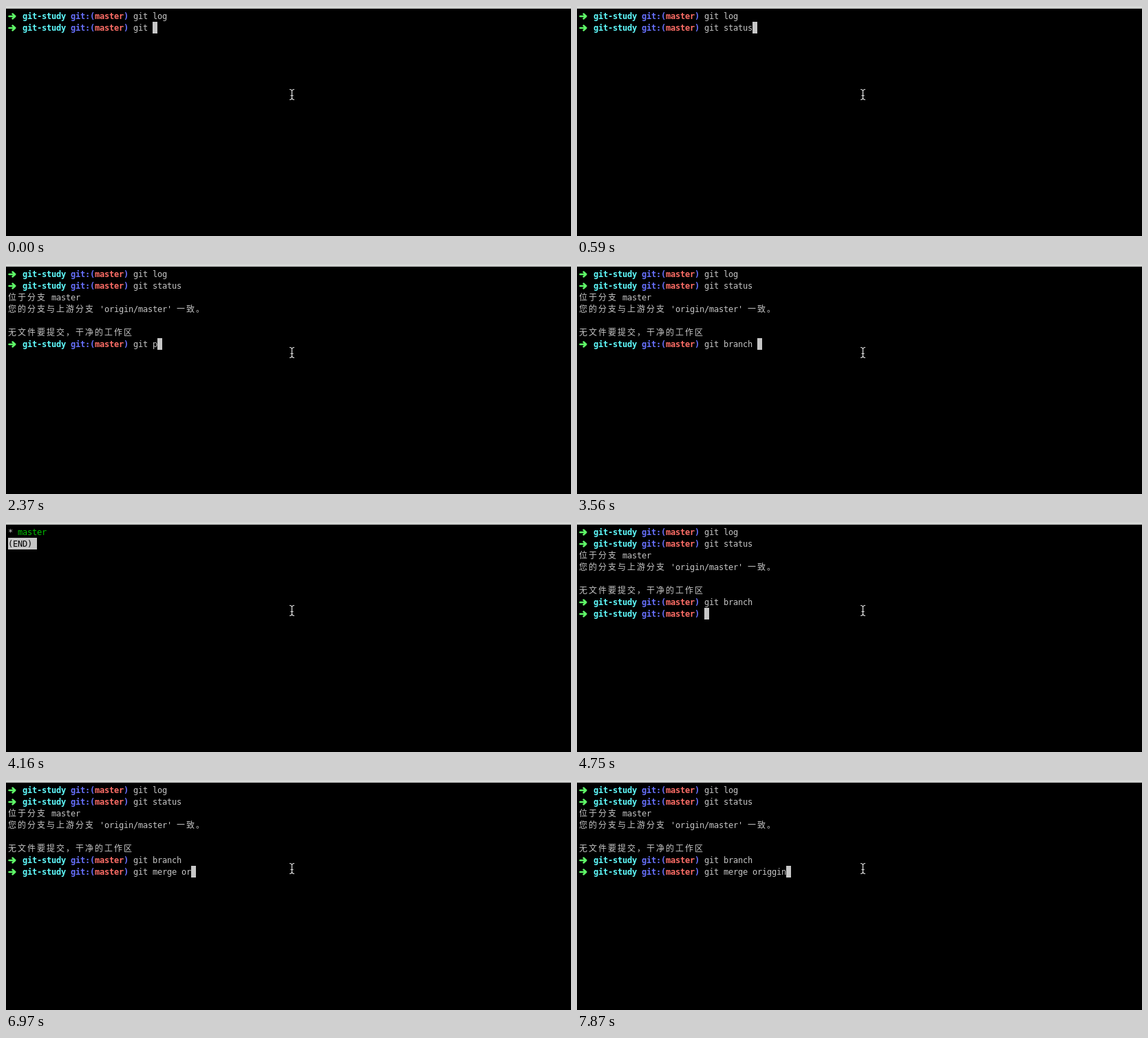
An HTML page with a canvas that plays this animation: 821 by 335 pixels, repeating every 8 s.

```html
<!DOCTYPE html>
<html lang="zh-CN">
<head>
<meta charset="utf-8">
<title>Terminal</title>
<style>
  html, body { margin: 0; width: 100%; height: 100%; overflow: hidden; background: #000; }
  canvas { display: block; width: 821px; height: 335px; }
</style>
</head>
<body>
<canvas id="screen" width="821" height="335"></canvas>
<script>
const ctx = document.getElementById('screen').getContext('2d', { alpha: false });
const LOOP = 8000;
const LEFT = 3, TOP = 6, CELL = 7, ROW = 17, BASELINE = 13;
const FONT = "12px 'DejaVu Sans Mono', 'Noto Sans CJK SC', 'Noto Sans CJK', monospace";
const GREY = '#c7c7c7', LIME = '#5ffa68', CYAN = '#60fdff', BLUE = '#6871ff',
      RED = '#ff6e67', GREEN = '#00c200';

// Each entry: [start time, text after the prompt]
const statusTyping = [
  [0, 'git '], [150, 'git st'], [300, 'git sta'], [440, 'git statu'], [590, 'git status']
];
const branchTyping = [
  [730, ''], [1030, 'gi'], [1180, 'git '], [2370, 'git p'], [2820, 'git '],
  [3120, 'git br'], [3270, 'git bran'], [3410, 'git branc'], [3560, 'git branch ']
];
const mergeTyping = [
  [4750, ''], [5200, 'gi'], [5340, 'git '], [5640, 'git me'], [5780, 'git mer'],
  [6080, 'git merg'], [6230, 'git merge '], [6970, 'git merge or'], [7120, 'git merge ori'],
  [7720, 'git merge origg'], [7870, 'git merge origgin']
];
const STATUS_END = 730, PAGER_START = 4160, PAGER_END = 4750;

const typedAt = (steps, t) => steps.filter(([start]) => start <= t).pop()[1];
const cellX = col => LEFT + col * CELL;
const rowY = row => TOP + row * ROW;

// Places characters on the terminal grid; CJK characters take two cells.
function print(text, col, row, color = GREY, bold = false) {
  ctx.font = (bold ? 'bold ' : '') + FONT;
  ctx.fillStyle = color;
  for (const ch of text) {
    ctx.fillText(ch, cellX(col), rowY(row) + BASELINE);
    col += ch > '\u2e7f' ? 2 : 1;
  }
}

function block(col, row, cells = 1) {
  ctx.fillStyle = GREY;
  ctx.fillRect(cellX(col), rowY(row), cells * CELL, ROW);
}

function strokePath(path, color, width) {
  ctx.strokeStyle = color;
  ctx.lineWidth = width;
  ctx.stroke(new Path2D(path));
}

function arrow(row) {
  ctx.save();
  ctx.translate(LEFT, rowY(row) + 9);
  ctx.lineCap = ctx.lineJoin = 'round';
  strokePath('M1.5 0H9M6.5 -3.5L10.3 0L6.5 3.5', LIME, 2.5);
  ctx.restore();
}

function prompt(row, command, active) {
  arrow(row);
  print('git-study', 3, row, CYAN, true);
  print('git:(', 13, row, BLUE, true);
  print('master', 18, row, RED, true);
  print(')', 24, row, BLUE, true);
  print(command, 26, row);
  if (active) block(26 + command.length, row);
}

function shell(t) {
  prompt(0, 'git log');
  prompt(1, typedAt(statusTyping, t), t < STATUS_END);
  if (t < STATUS_END) return;
  print('位于分支 master', 0, 2);
  print("您的分支与上游分支 'origin/master' 一致。", 0, 3);
  print('无文件要提交，干净的工作区', 0, 5);
  prompt(6, typedAt(branchTyping, t), t < PAGER_START);
  if (t >= PAGER_END) prompt(7, typedAt(mergeTyping, t), true);
}

function pager() {
  print('*', 0, 0);
  print('master', 2, 0, GREEN);
  block(0, 1, 6);
  print('(END)', 0, 1, '#000');
}

function mousePointer() {
  strokePath('M412 121.5Q415.5 121.5 415.5 124.5Q415.5 121.5 419 121.5' +
    'M415.5 124V134M412 136.5Q415.5 136.5 415.5 133.5Q415.5 136.5 419 136.5' +
    'M413.5 130.5H417.5', '#e4e4e4', 1.2);
}

function draw(t) {
  ctx.fillStyle = '#000';
  ctx.fillRect(0, 0, 821, 335);
  ctx.fillStyle = '#d6d8d6';
  ctx.fillRect(0, 0, 821, 3);
  ctx.fillStyle = '#b4b6b4';
  ctx.fillRect(0, 3, 821, 1);
  if (t >= PAGER_START && t < PAGER_END) pager();
  else shell(t);
  mousePointer();
}

const start = performance.now();
function tick() {
  draw((performance.now() - start) % LOOP);
  requestAnimationFrame(tick);
}
tick();
</script>
</body>
</html>
```
